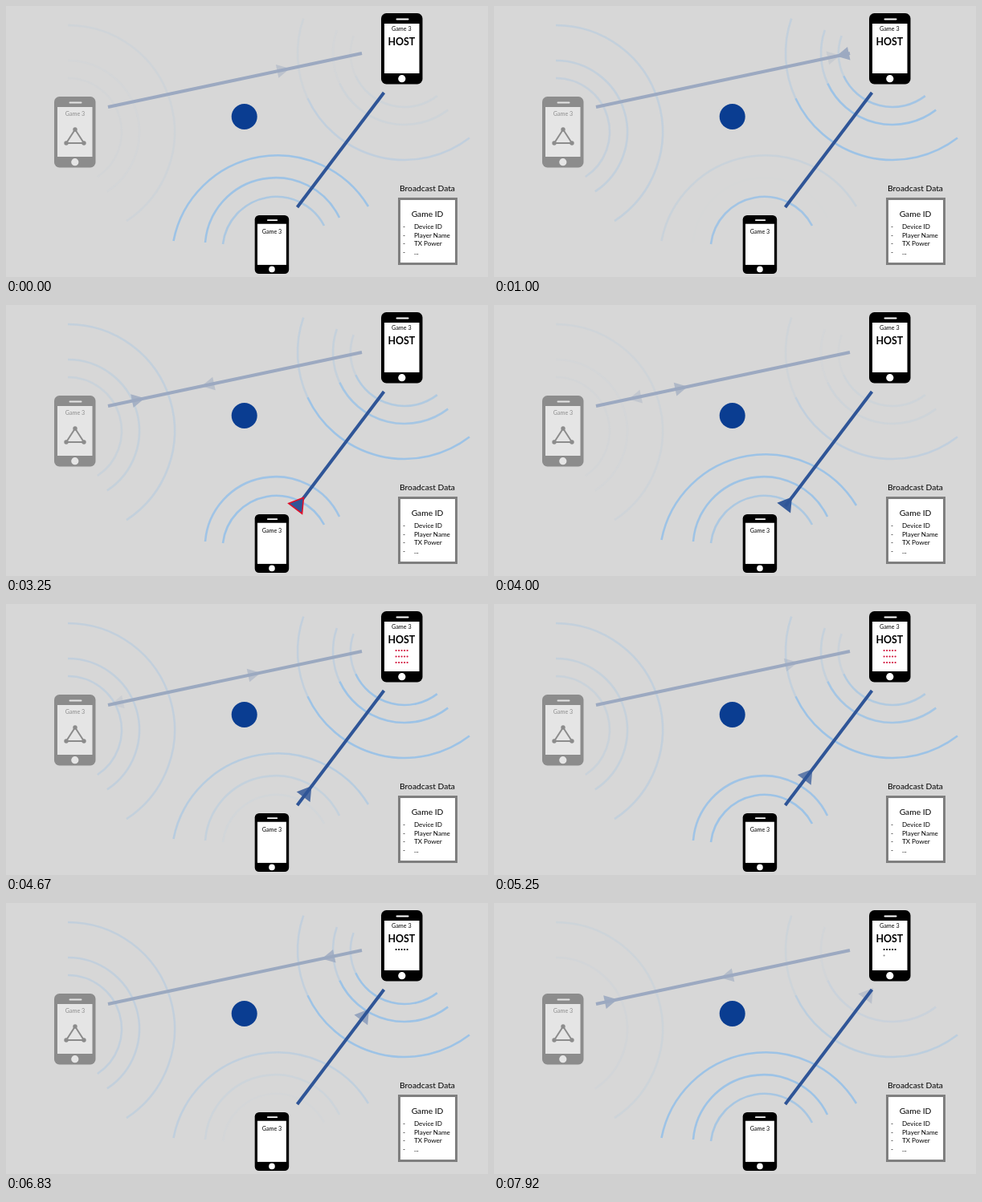
Recreate the animation shown at these times as an HTML page. Size 600 by 338 pixels, loop 8 s.

```html
<!DOCTYPE html>
<html lang="en">
<head>
<meta charset="utf-8">
<title>Broadcast Data</title>
<style>
  html, body { margin: 0; width: 100%; height: 100%; overflow: hidden; background: #d7d7d7; }
  svg { display: block; width: 100%; height: 100%; }
  text { font-family: Lato, "Open Sans", sans-serif; fill: #000; }
  .mid { text-anchor: middle; }
  .small { font-size: 7.2px; }
  .list { font-size: 8.1px; }
  .title { font-size: 10.25px; }
  .wave { fill: none; stroke: #9dc3e6; stroke-width: 2.6; }
  .link { stroke: #2f5597; stroke-width: 4; }
  .arrow { fill: #2f5597; }
  .dim { opacity: .35; }
</style>
</head>
<body>
<svg viewBox="0 0 600 338">
  <defs>
    <g id="phone">
      <rect width="51.5" height="88.5" rx="6.5"/>
      <rect x="4" y="13" width="43.5" height="62" fill="#fff"/>
      <rect x="18.5" y="6.5" width="16" height="2" rx="1" fill="#fff"/>
      <circle cx="25.8" cy="81.7" r="4.6" fill="#fff"/>
    </g>
  </defs>

  <g class="dim">
    <g id="farWaves"></g>
    <line class="link" x1="127" y1="126" x2="443" y2="59"/>
    <path id="toHost" class="arrow" d="M8 0L-8-8.5V8.5Z"/>
    <path id="fromHost" class="arrow" d="M8 0L-8-8.5V8.5Z"/>
    <use href="#phone" x="60" y="113"/>
    <text class="mid small" x="86" y="137">Game 3</text>
    <path d="M86 154L75 171H97Z" fill="none" stroke="#000" stroke-width="2"/>
    <circle cx="86" cy="154" r="2.7"/><circle cx="75" cy="171" r="2.7"/><circle cx="97" cy="171" r="2.7"/>
  </g>

  <g id="nearWaves"></g>
  <line class="link" x1="362.5" y1="251" x2="470.5" y2="108"/>
  <path id="request" class="arrow" d="M9 0L-8-10.5V10.5Z" stroke="#e0102a"/>

  <use href="#phone" x="467" y="9"/>
  <text class="mid small" x="492.3" y="31">Game 3</text>
  <text class="mid" x="492.3" y="49.3" font-size="12.4" font-weight="bold">HOST</text>
  <g id="dots"></g>

  <use href="#phone" transform="translate(309.7 261) scale(.825)"/>
  <text class="mid small" x="331" y="283.5">Game 3</text>

  <circle cx="296.7" cy="138" r="16" fill="#0a3d91"/>

  <text class="mid title" x="524.5" y="231">Broadcast Data</text>
  <rect x="489.5" y="240.5" width="71" height="81" fill="#fff" stroke="#7f7f7f" stroke-width="3"/>
  <text class="mid title" x="524.5" y="263">Game ID</text>
  <g id="list"></g>
</svg>

<script>
const LOOP = 8, WAVE_PERIOD = 2, TRIP_PERIOD = 5;
const byId = id => document.getElementById(id);
const mod = (a, n) => ((a % n) + n) % n;
const clamp = v => Math.max(0, Math.min(1, v));
const ease = u => (1 - Math.cos(Math.PI * u)) / 2;

function add(parent, tag, attrs, content = '') {
  const el = document.createElementNS('http://www.w3.org/2000/svg', tag);
  for (const key in attrs) el.setAttribute(key, attrs[key]);
  el.textContent = content;
  return byId(parent).appendChild(el);
}

['Device ID', 'Player Name', 'TX Power', '...'].forEach((label, i) => {
  const y = 278 + i * 10.7;
  add('list', 'text', { x: 494, y, class: 'list' }, '-');
  add('list', 'text', { x: 508, y, class: 'list' }, label);
});

// Waves: three nested arcs per sender, listed from the inside out.
const waves = [];
function addWave(parent, d, order, offset) {
  waves.push({ el: add(parent, 'path', { d, class: 'wave' }), order, offset });
}
function arcPath(cx, cy, r, from, to) {
  const point = deg => {
    const a = deg * Math.PI / 180;
    return `${cx + r * Math.cos(a)} ${cy + r * Math.sin(a)}`;
  };
  return `M${point(from)}A${r} ${r} 0 0 1 ${point(to)}`;
}
[67, 89, 133].forEach((r, i) => {
  addWave('farWaves', arcPath(77, 157, r, -90, 56.7), i, 0);
  addWave('farWaves', arcPath(496, 59, r, 155, 199), i, 0);
  addWave('nearWaves', arcPath(496, 59, r, 52.5, 155), i, 0);
});
['M270 297A67 67 0 0 1 396 274', 'M248 295A88 88 0 0 1 415 264', 'M208.5 293A132 132 0 0 1 451 250']
  .forEach((d, i) => addWave('nearWaves', d, i, .85));

function waveOpacity(t, { order, offset }) {
  const u = mod(t - offset + .03 - order * .24, WAVE_PERIOD);
  return clamp(Math.min(u / .2, 1 - (u - .9) / 1.05));
}

const dots = Array.from({ length: 15 }, (_, i) => add('dots', 'circle', {
  cx: 485.6 + (i % 5) * 3.5, cy: 58 + Math.floor(i / 5) * 7.5, r: 1.1
}));

// Arrows ease along their link and grow fainter on the way.
function travel(id, u, [x1, y1], [x2, y2], visible) {
  const el = byId(id), k = ease(clamp(u));
  const angle = Math.atan2(y2 - y1, x2 - x1) * 180 / Math.PI;
  el.setAttribute('transform', `translate(${x1 + (x2 - x1) * k} ${y1 + (y2 - y1) * k}) rotate(${angle})`);
  el.setAttribute('opacity', visible ? 1 - .87 * clamp(u) : 0);
}

const farEnd = [134, 124.5], hostEnd = [434, 60.9];

function draw(t) {
  for (const wave of waves) wave.el.setAttribute('opacity', waveOpacity(t, wave));

  const out = mod(t - 2.4, TRIP_PERIOD) / 4.1;
  const back = mod(t - .97, TRIP_PERIOD) / 4;
  travel('toHost', out, farEnd, hostEnd, out < 1);
  travel('fromHost', back, hostEnd, farEnd, back < 1);

  travel('request', (t - 3.8) / 4.3, [365, 247.5], [467, 112.5], t > 2.2);
  byId('request').setAttribute('stroke-width', t < 3.4 ? 1.6 : 0);

  const red = t > 4.6 && t < 5.7;
  const typed = t < 5.7 ? 0 : t < 7.8 ? Math.min(5, (t - 6) / .14) : 5 + (t - 7.8) / .25;
  dots.forEach((dot, i) => {
    dot.setAttribute('fill', red ? '#d01038' : '#000');
    dot.setAttribute('opacity', red ? 1 : clamp(typed - i));
  });
}

function frame() {
  draw(performance.now() / 1000 % LOOP);
  requestAnimationFrame(frame);
}
frame();
</script>
</body>
</html>
```
